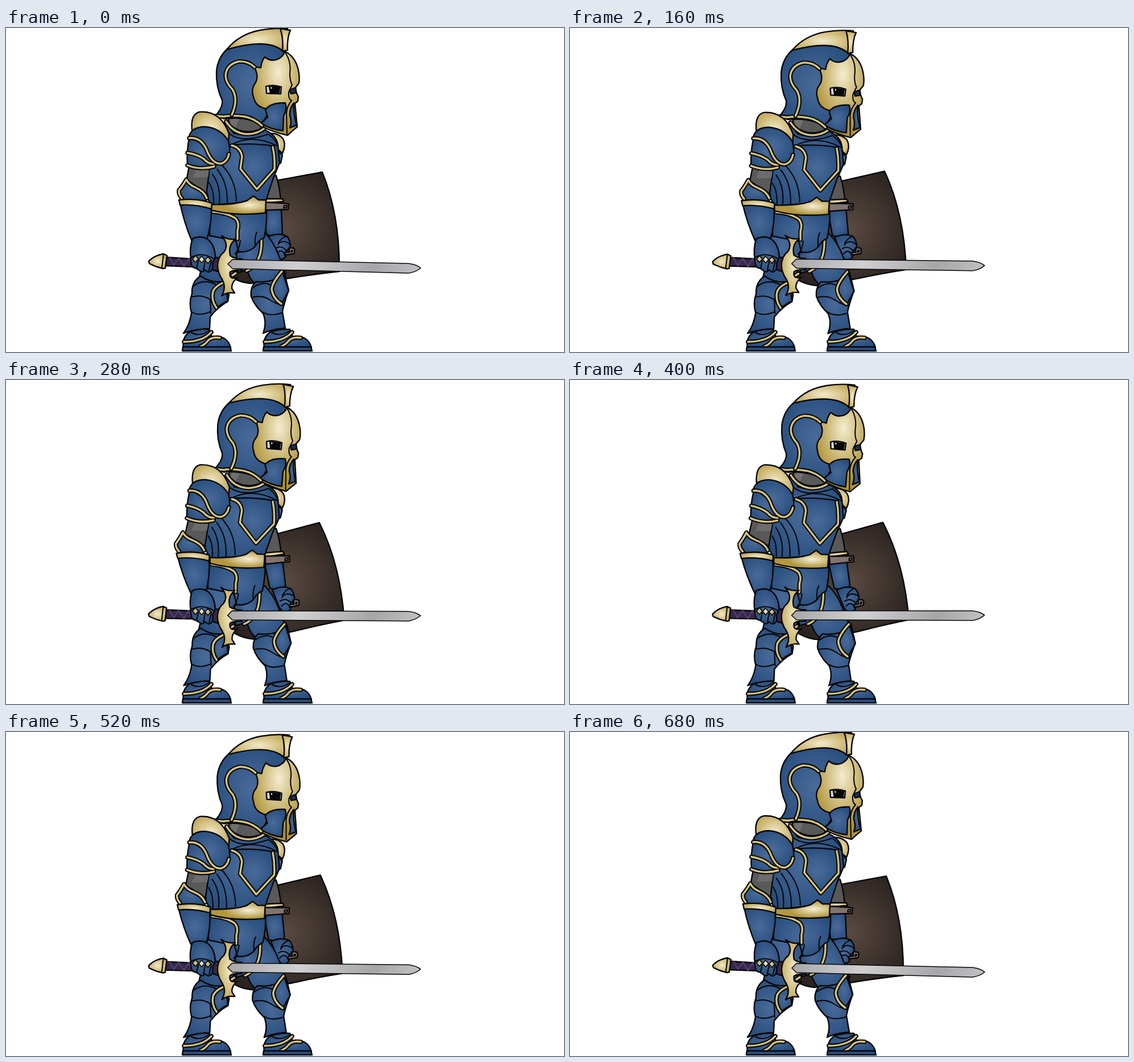
Recreate the animation shown at these times as an HTML page. Size 981 by 571 pixels, loop 720 ms.

```html
<!DOCTYPE html>
<html lang="en">
<head>
<meta charset="utf-8">
<title>Idle knight</title>
<style>
html, body { margin: 0; width: 100%; height: 100%; overflow: hidden; background: #fff; }
svg { display: block; }
path { stroke: #060608; stroke-width: 2.4; stroke-linejoin: round; stroke-linecap: round; }
.b { fill: url(#blue); }
.g { fill: url(#gold); }
.n { fill: #595959; }
.l { fill: none; stroke-width: 2.1; }
.t { fill: none; stroke: #d6c27c; stroke-width: 3.4; }
.o { fill: none; stroke-width: 7.6; }
</style>
</head>
<body>
<svg width="981" height="571" viewBox="0 0 981 571">
<defs>
  <radialGradient id="blue" r=".58"><stop stop-color="#4a6b9a"/><stop offset="1" stop-color="#274d7c"/></radialGradient>
  <radialGradient id="gold" r=".6"><stop stop-color="#f2e9c9"/><stop offset="1" stop-color="#bda350"/></radialGradient>
  <radialGradient id="belt" cx=".7" r=".45"><stop stop-color="#f6efd8"/><stop offset="1" stop-color="#b3983f"/></radialGradient>
  <radialGradient id="face" cx=".55" cy=".25" r=".62"><stop stop-color="#f4eccf"/><stop offset="1" stop-color="#ae9235"/></radialGradient>
  <radialGradient id="wood" cx=".52" cy=".5" r=".6"><stop stop-color="#594a41"/><stop offset="1" stop-color="#2a221f"/></radialGradient>
  <linearGradient id="steel" gradientUnits="userSpaceOnUse" x1="390" y1="400" x2="500" y2="450" spreadMethod="reflect">
    <stop stop-color="#a6a6a8"/><stop offset=".45" stop-color="#b9b9bb"/><stop offset="1" stop-color="#d0d0d1"/>
  </linearGradient>
</defs>

<!-- data-move: degrees, pivot x, pivot y, shift x, shift y -->
<g data-move="-5.2 520 318 0 0">
  <path fill="url(#wood)" d="M430 277L556 254Q587 330 586 429Q540 434 498 441L430 450Q405 448 385 431Z"/>
</g>

<g data-move="-1 465 265 0 2">
  <path class="n" d="M455 262L475 260Q481 280 483 303L456 304Z"/>
</g>
<g data-move="-5 472 300 1 2.5">
  <path class="b" d="M452 318L484 319L486 362Q476 370 458 364Z"/>
  <path class="g" d="M454 301L486 301L488 306L454 308Z"/>
  <path fill="#83736d" d="M454 307L489 309L497 310L496 320L487 320L454 321Z"/>
  <path class="l" d="M489 313L494 313L493 317L488 317Z"/>
  <path class="b" d="M462 367Q480 360 494 367Q500 374 500 386L493 393Q494 404 487 407Q477 410 472 399Z"/>
  <path class="l" d="M478 382Q486 371 499 381M474 388Q484 382 493 392M476 397Q485 388 490 399M494 367Q486 368 479 378"/>
  <path fill="#83736d" d="M498 387L506 388Q509 392 506 398L490 400L491 395L498 395Z"/>
  <path class="l" d="M502 392L504 392L503 395L501 395Z"/>
</g>

<g data-move="0 0 0 0 2">
  <path class="b" d="M407 385L455 361Q471 377 480 402L492 432Q478 459 452 459Q432 452 425 430Z"/>
</g>
<g data-move="1.2 470 540 3 1">
  <path class="n" d="M466 526L487 526L494 543L466 545Z"/>
  <path class="b" d="M439 447Q429 457 431 473Q436 488 452 503Q459 520 452 538Q470 530 491 529L486 500Q488 488 497 462L489 430Q474 450 439 447Z"/>
  <path class="l" d="M434 458Q452 444 469 455M432 475Q449 470 462 478Q474 486 486 489M441 491Q456 512 485 502"/>
  <path class="b" d="M485 427Q467 445 465 460Q468 478 484 487L497 463Z"/>
  <path class="t" d="M485 429Q469 447 467 460Q469 476 484 486"/>
</g>

<g data-move="0 0 0 -1 1">
  <path class="b" d="M362 320Q356 352 349 400L339 442Q362 455 387 450Q405 430 411 390L410 345Z"/>
</g>
<g data-move="0 0 0 .5 .5">
  <path class="b" d="M342 437Q326 447 327 468Q321 484 326 502Q323 523 312 538Q333 530 358 530L359 509Q372 492 390 482L392 470L384 446Q362 451 342 437Z"/>
  <path class="l" d="M328 456Q347 440 371 453M326 474Q344 469 358 478M326 500Q339 509 359 500M359 478L360 503"/>
  <path class="b" d="M386 448Q366 452 361 466Q361 486 370 494Q380 485 390 481Z"/>
  <path class="t" d="M387 447Q369 453 364 464Q360 479 370 493"/>
</g>
<g id="foot">
  <path class="b" d="M312 563Q309 546 322 536Q340 530 357 531L362 544Q388 540 395 563Z"/>
  <path class="t" d="M313 553Q346 553 361 536M342 561Q350 558 355 551Q362 544 376 546"/>
  <path class="l" d="M326 537Q340 545 358 533"/>
  <path fill="#2b4c7d" d="M311 562L394 562L396 569L310 569Z"/>
</g>
<use href="#foot" x="142"/>

<g data-move="1 410 330 -3 2">
  <path class="b" d="M443 372L450 366Q451 396 443 413Q433 425 408 431L405 397Z"/>
  <path class="t" d="M449 372Q450 398 441 412Q433 424 423 428M398 436L404 432"/>
  <path class="b" d="M358 320L458 322Q459 345 454 369Q444 374 438 385Q426 397 409 394L404 375L358 366Z"/>
  <path class="l" d="M441 360Q437 366 438 384M412 375Q410 390 403 398"/>
  <path class="t" d="M364 324Q390 326 404 336Q411 344 407 357L407 372"/>
</g>

<g data-move="1.5 393 215 0 3">
  <path class="g" d="M461 186Q478 184 487 195Q493 206 486 221L478 214Z"/>
  <path class="b" d="M478 216L486 224L483 238L477 240Z"/>
  <path class="b" d="M385 165L400 185Q430 194 456 180Q476 190 478 206L481 238L470 264L457 304L440 306L362 312Q346 292 349 268L360 240Z"/>
  <path class="l" d="M379 241Q404 266 405 305M371 249Q390 272 389 309M363 258Q378 278 375 310M357 273Q366 286 365 310M390 184Q412 205 461 187M397 205Q435 186 477 208M461 187Q474 196 478 208"/>
  <path class="b" d="M397 206Q413 210 415 227L411 248L441 285L473 249Q475 227 470 208Q433 202 397 206Z"/>
  <path class="t" d="M397 207Q413 211 415 227L412 248L441 284L472 249Q473 228 469 210"/>
  <path fill="url(#belt)" d="M361 311Q401 312 424 304L435 296L444 303L457 303L456 326Q404 332 361 321Z"/>
  <path class="n" d="M392 153Q388 165 396 172Q418 190 447 178L455 158Z"/>
  <path d="M396 158L411 158L403 176L394 168Z" fill="#707070" style="stroke:none"/>
  <path class="t" d="M387 165Q401 187 426 187Q443 186 454 177"/>
</g>

<g data-move="2.7 327 132 0 0">
  <path class="b" d="M368 155Q382 139 380 127Q369 104 370 77Q372 52 390 36Q440 10 489 41L495 80L450 172Q425 155 384 160Z"/>
  <path class="g" d="M388 38Q410 11 446 4Q471 -1 495 1L486 40Q459 17 388 38Z"/>
  <path class="g" d="M482 1L500 4Q494 17 495 39L486 41Q488 18 482 1Z"/>
  <path fill="url(#face)" d="M490 41Q507 49 513 70Q517 84 515 97L509 105Q510 115 514 121L513 129L508 133L512 174L495 189Q470 184 447 172L461 158L456 142Q438 138 435 121Q430 107 439 96Q445 84 436 68L448 70Q449 59 455 51Q465 60 478 55Q488 50 490 41Z"/>
  <path class="l" d="M490 42Q502 59 499 80Q499 93 503 100L497 113Q496 125 502 128Q494 137 493 150L494 186"/>
  <path class="b" d="M456 144Q465 131 491 132Q495 142 488 155L487 181Q466 179 448 168L460 157Z"/>
  <path class="b" d="M506 132Q498 142 499 154Q503 164 499 176L511 171Q505 153 506 132Z"/>
  <path class="t" d="M369 155L383 156Q398 153 419 156Q436 159 450 172"/>
  <path class="t" d="M437 69Q426 58 409 59Q388 64 386 83Q386 96 398 108Q409 126 397 153"/>
  <path fill="#d8d8d8" d="M457 103Q469 99 484 104L483 116L458 115Z"/>
  <path fill="#060608" d="M463 103L481 105L480 115L465 115Z"/>
  <path fill="#1c3155" d="M499 109L509 105L510 114L501 116Z"/>
  <path fill="#fff" style="stroke:none" d="M465 104L468 105L466 108Z"/>
</g>

<g data-move="-1.25 345 412 -.5 -.3">
  <path fill="#36284a" d="M281 404L329 407L358 408Q367 402 377 406L376 430Q362 427 356 422L281 419Z"/>
  <path d="M288 405L295 418L304 406L313 420L321 407L328 421" fill="none" style="stroke:#513c6b;stroke-width:2.6"/>
  <path class="g" d="M251 411Q260 401 277 398L283 401L280 423L276 424Q263 421 252 415Z"/>
  <path class="l" d="M277 399L274 422"/>
  <path class="g" d="M379 366Q389 374 404 372Q390 382 394 401Q402 407 415 407L404 416L415 427Q401 425 394 430Q391 444 407 440Q396 448 397 459L402 467Q389 465 379 472Q388 457 380 443Q372 431 372 418Q373 402 383 395Q393 382 379 366Z"/>
  <path fill="url(#steel)" style="stroke-width:1.5" d="M390 416L398 408L708 415Q722 417 729 423Q721 430 708 432L398 424Z"/>
</g>

<g data-move="2.5 350 215 0 3">
  <path class="n" d="M322 243L316 276L352 295L358 246Z"/>
  <path d="M334 249L357 251L355 263L328 264Z" fill="#6c6c6c" style="stroke:none"/>
  <path class="b" d="M323 190Q317 215 319 243Q343 254 368 243L370 222Z"/>
  <path class="t" d="M319 220Q337 223 348 231Q357 241 367 239M319 242Q342 251 366 244"/>
</g>
<g data-move="1.5 393 215 0 3">
  <path class="g" d="M327 180Q324 152 340 148Q377 145 392 186L391 205Q363 170 327 180Z"/>
  <path class="b" d="M321 195Q324 174 350 174Q377 176 391 199Q398 228 384 238Q366 246 354 219Q343 194 321 195Z"/>
  <path class="t" d="M322 194Q342 192 352 213Q362 240 378 239Q389 236 392 222"/>
</g>
<g data-move="-2.9 345 405 0 .5">
  <path class="b" d="M316 266L302 288L309 303L352 305L355 293Z"/>
  <path class="t" d="M353 300Q349 288 333 281Q321 276 317 267Q310 279 304 286Q303 293 309 300"/>
  <path class="b" d="M306 309L361 315Q362 347 352 376L327 376Q313 343 306 309Z"/>
  <path class="g" d="M304 303Q336 299 362 309L361 319Q333 310 306 312Z"/>
</g>
<g data-move="-1.2 345 410 0 0">
  <path class="b" d="M328 371Q342 365 354 372Q367 381 368 404L363 415Q365 430 355 430L349 426Q346 433 338 426L333 423Q324 422 325 407Q322 388 328 371Z"/>
  <path class="l" d="M326 404Q344 394 364 406M338 410L335 423M350 411L347 426M361 410L357 427"/>
  <path class="g" d="M333 401L338 407L333 413L328 407ZM344 402L349 408L344 414L339 408ZM355 403L360 409L355 415L350 409Z" style="stroke-width:1.6"/>
</g>
</svg>
<script>
// Every gold trim gets a wider dark line beneath it.
for (const trim of document.querySelectorAll('.t')) {
  const edge = trim.cloneNode();
  edge.setAttribute('class', 'o');
  trim.before(edge);
}

const parts = [...document.querySelectorAll('[data-move]')].map(el => ({
  el, move: el.dataset.move.split(' ').map(Number)
}));
const LOOP = 720, STEP = 40, PEAK = 360, END = 680;
const REACH = 1.14;

function draw(now) {
  const t = Math.floor(now % LOOP / STEP) * STEP;
  const bend = REACH * Math.min(t / PEAK, (END - t) / (END - PEAK));
  for (const { el, move: [angle, x, y, dx, dy] } of parts) {
    el.setAttribute('transform',
      `translate(${dx * bend} ${dy * bend}) rotate(${angle * bend} ${x} ${y})`);
  }
  requestAnimationFrame(draw);
}
draw(performance.now());
</script>
</body>
</html>
```
